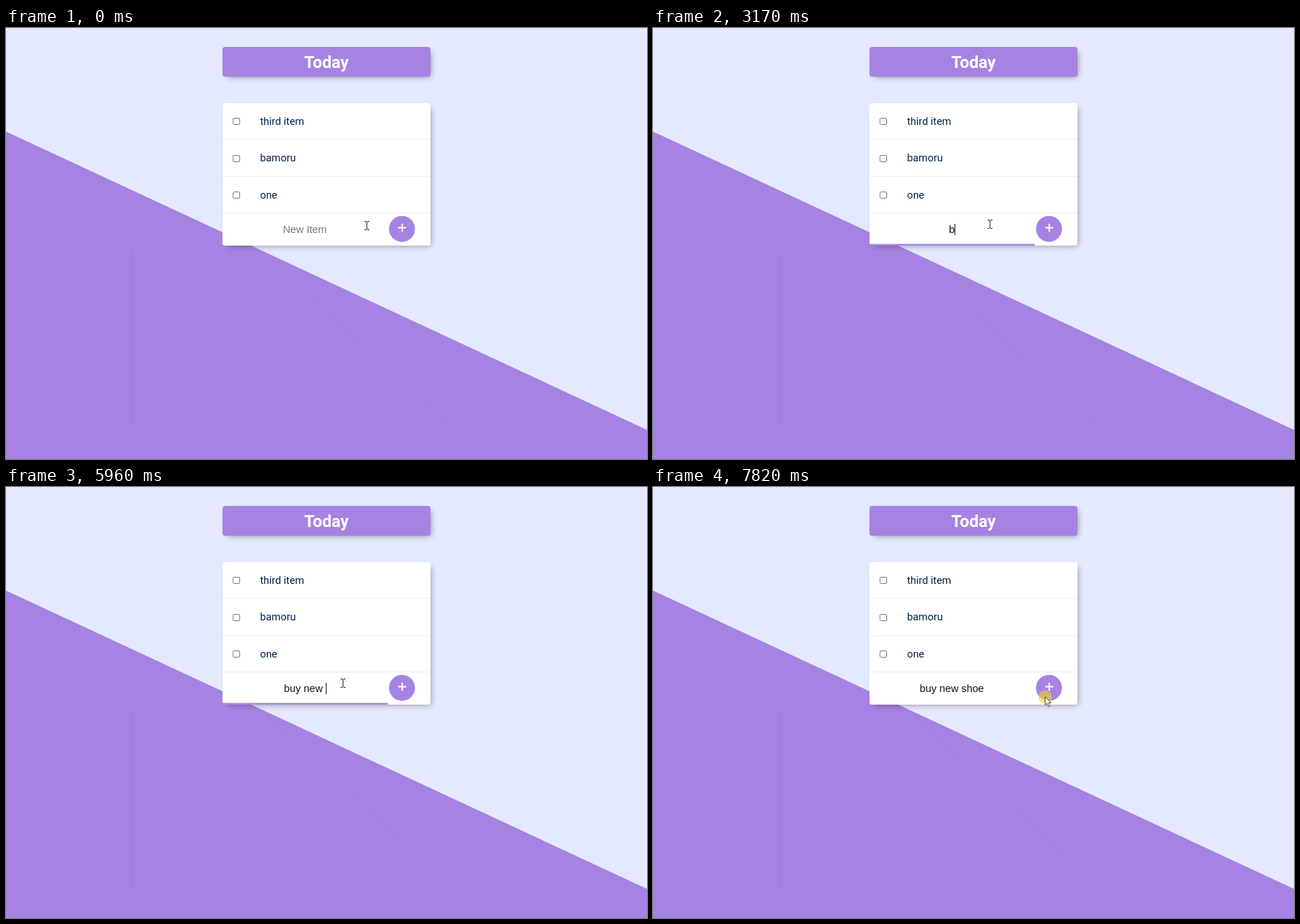
An HTML page for the animation above (8 s loop, 912 px wide and 614 px high).

```html
<!DOCTYPE html>
<html lang="en">
<head>
<meta charset="utf-8">
<title>Today</title>
<style>
  html, body { margin: 0; width: 100%; height: 100%; overflow: hidden; background: #e4e9fd; }
  svg { display: block; width: 100%; height: 100%; }
  text { white-space: pre; }
  .item { font: 14.8px Roboto, sans-serif; fill: #00204a; }
  .title { font: bold 23.7px Roboto, sans-serif; fill: #fff; text-anchor: middle; }
  .entry { font: 14.8px "Liberation Sans", Arial, sans-serif; text-anchor: middle; }
</style>
</head>
<body>
<svg viewBox="0 0 912 614">
  <defs>
    <filter id="soft" x="-20%" y="-60%" width="140%" height="220%">
      <feGaussianBlur stdDeviation="5"/>
    </filter>
  </defs>

  <rect width="912" height="614" fill="#e4e9fd"/>
  <path d="M0 147.4L912 572.6V614H0Z" fill="#a683e3"/>
  <path d="M179.5 315V572M366 320L637 572" fill="none" stroke="#8f6bcf" stroke-opacity=".3"/>

  <rect x="315.4" y="34.4" width="288.6" height="35.1" opacity=".4" filter="url(#soft)"/>
  <rect x="308" y="27" width="296" height="42.5" rx="3.7" fill="#a683e3"/>
  <text class="title" x="456" y="56.6">Today</text>

  <rect x="315.4" y="114.4" width="288.6" height="195.6" opacity=".4" filter="url(#soft)"/>
  <rect x="308" y="107" width="296" height="203" rx="3.7" fill="#fff"/>
  <g id="items"></g>

  <rect id="underline" x="308" y="307.6" width="235" height="2.3" fill="#a683e3"/>
  <text id="entry" class="entry" x="425.2" y="292"></text>
  <rect id="caret" y="279" width="1" height="16" fill="#111"/>

  <circle cx="563.4" cy="286.2" r="18.5" fill="#a683e3"/>
  <path d="M558 284.5H569.4M563.7 278.8V290.2" stroke="#fff" stroke-width="2"/>

  <g id="pointer">
    <circle id="press" r="9.5" fill="#f0d71e" fill-opacity=".6"/>
    <path id="beam" d="M-3 -5.5H-1L.5 -4.5L2 -5.5H4M.5 -4.5V5.5M-3 6.5H-1L.5 5.5L2 6.5H4" fill="none" stroke="#222"/>
    <path id="arrow" d="M0 0V11.6L2.7 9.1L4.7 13.7L6.7 12.8L4.7 8.4H8.2Z" fill="#fff" stroke="#333" stroke-width=".9"/>
  </g>
</svg>
<script>
const LOOP = 8000, CENTER = 425.2;
const $ = id => document.getElementById(id);
const show = (el, on) => el.setAttribute('visibility', on ? 'visible' : 'hidden');

// Each track is a list of [start, value...] held until the next start.
const typed = [
  [0, ''], [3170, 'b'], [3500, 'bu'], [3700, 'buy'], [4240, 'buy '],
  [4360, 'buy n'], [4430, 'buy ne'], [4630, 'buy new'], [5960, 'buy new '],
  [6040, 'buy new sh'], [6160, 'buy new sho'], [6490, 'buy new shoe']
];
const blink = [
  [0, 0], [2030, 1], [2520, 0], [3040, 1], [5220, 0], [5480, 1],
  [7020, 0], [7550, 1], [7770, 0]
];
const path = [
  [0, 513, 281], [1230, 497, 280], [1320, 482, 279], [1410, 479, 279],
  [7090, 492, 286], [7150, 518, 299], [7220, 536, 308],
  [7350, 547, 306], [7420, 552, 303], [7480, 556, 300], [7550, 558, 299]
];

function at(track, t) {
  let now = track[0];
  for (const step of track) if (step[0] <= t) now = step;
  return now;
}

$('items').innerHTML = ['third item', 'bamoru', 'one'].map((label, i) => {
  const y = i * 52.6;
  return `<rect x="323" y="${Math.round(128 + y) + .5}" width="9.5" height="9" rx="1.5" fill="#fff" stroke="#767676"/>
    <text class="item" x="361.5" y="${137.5 + y}">${label}</text>
    <rect x="308" y="${Math.round(158 + y)}" width="296" height="1" fill="#eceefa"/>`;
}).join('');

function draw(t) {
  const text = at(typed, t)[1];
  const entry = $('entry');
  entry.textContent = text || 'New Item';
  entry.setAttribute('fill', text ? '#111' : '#757575');

  const half = text ? entry.getComputedTextLength() / 2 : 0;
  $('caret').setAttribute('x', Math.round(CENTER + half - .2));
  show($('caret'), at(blink, t)[1]);
  show($('underline'), t >= 1410 && t < 7820);

  const [, x, y] = at(path, t);
  $('pointer').setAttribute('transform', `translate(${x} ${y})`);
  show($('beam'), t < 7350);
  show($('arrow'), t >= 7350);
  show($('press'), (t >= 1410 && t < 1500) || t >= 7770);
}

const start = performance.now();
function tick() {
  draw((performance.now() - start) % LOOP);
  requestAnimationFrame(tick);
}
tick();
</script>
</body>
</html>
```
